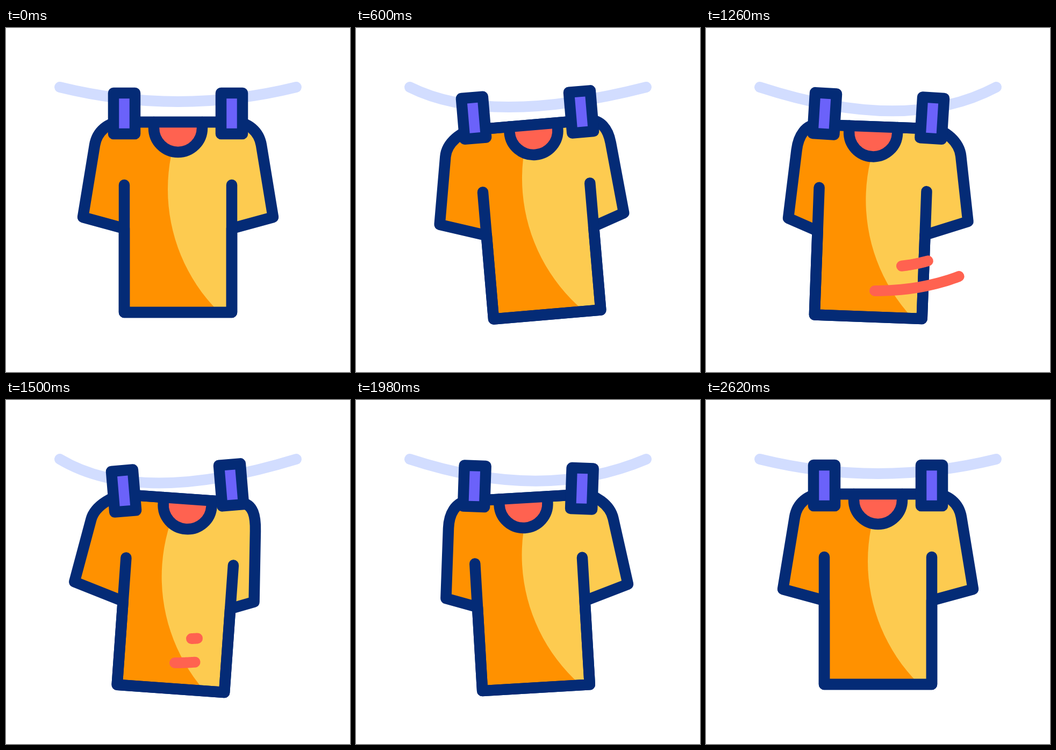
Animation of 640x640 px, one loop 3000 ms. Source, as an HTML page with a canvas:

```html
<!DOCTYPE html>
<html lang="en">
<head>
<meta charset="utf-8">
<title>Shirt on a clothesline</title>
<style>
  html, body { margin: 0; width: 100%; height: 100%; overflow: hidden; background: #fff; }
  canvas { display: block; }
</style>
</head>
<body>
<canvas width="640" height="640"></canvas>
<script>
const ctx = document.querySelector('canvas').getContext('2d');
const LOOP = 3000, START = 200, END = 2610;
const LAG = 60, GAIN = 1.3; // the shirt follows the pegs later and wider
const NAVY = '#042b76', ORANGE = '#ff9100', YELLOW = '#fdcb50';
const RED = '#ff6250', PURPLE = '#6b62fa', ROPE = '#d2ddff';

const clamp = v => Math.max(0, Math.min(1, v));
const ease = u => (1 - Math.cos(Math.PI * u)) / 2;
const radians = deg => deg * Math.PI / 180;

// Turning points of the peg tilt: time, degrees
const turns = [
  [START, 0], [360, 5], [590, -4.8], [890, -6.4], [1400, 5.6], [1540, -7],
  [1685, 5.7], [1850, -5.5], [2040, 4], [2205, -5.3], [2400, 3.2], [END - LAG, 0]
];

const tiltAt = t => turns.reduce((angle, [time, target], i) => {
  if (!i) return target;
  const before = turns[i - 1][0];
  return angle + (target - angle) * ease(clamp((t - before) / (time - before)));
}, 0);

const sagAt = t => 4.5 * Math.sin(Math.PI * clamp((t - START) / (END - START))) ** 0.8;

function stroke(color, path) {
  ctx.strokeStyle = color;
  ctx.stroke(path);
}

function fill(color, path) {
  ctx.fillStyle = color;
  ctx.fill(path);
}

function peg(x, y, angle) {
  ctx.save();
  ctx.translate(x, y);
  ctx.rotate(angle);
  const box = new Path2D('M-20-38h40v76h-40z');
  fill(PURPLE, box);
  stroke(NAVY, box);
  ctx.restore();
}

const gusts = [
  { curve: [502, 398, 415, 442, 345, 444], head: [811, 1330], tail: [920, 1550] },
  { curve: [511, 444, 425, 489, 314, 489], head: [960, 1250], tail: [1170, 1570] }
];

function gust({ curve: [x0, y0, x1, y1, x2, y2], head, tail }, t) {
  const part = ([a, b]) => clamp((t - a) / (b - a));
  const start = part(tail), end = part(head);
  if (end <= start) return;
  const line = new Path2D();
  for (let i = 0; i <= 24; i++) {
    const u = start + (end - start) * i / 24, w = 1 - u;
    line.lineTo(w * w * x0 + 2 * u * w * x1 + u * u * x2, w * w * y0 + 2 * u * w * y1 + u * u * y2);
  }
  stroke(RED, line);
}

function draw(t) {
  const tilt = tiltAt(t), swing = GAIN * tiltAt(t - LAG), sag = sagAt(t);
  const x = 320 - 1.85 * tilt - 1.38 * swing, y = 292 + 1.9 * sag;
  const collarX = 0.36 * swing - 1.16 * tilt;
  const angle = radians(swing), cos = Math.cos(angle), sin = Math.sin(angle);
  const at = (px, py) => [x + (px - 320) * cos - (py - 292) * sin, y + (px - 320) * sin + (py - 292) * cos];

  // Points from the collar side of a shoulder down to the armpit; side is -1 or 1
  function sleeve(side) {
    const sx = 320 + side * (155 - 0.5 * sag) + tilt - swing;
    const sy = 218 + 3.3 * sag + side * 2.7 * swing;
    const cx = 320 + side * (177 - 2.2 * sag) + 2.27 * tilt - 3.67 * swing;
    const cy = 352 + 1.1 * sag + side * (3.31 * swing - 1.1 * tilt);
    const k = 26 / Math.hypot(sx - cx, sy - cy);
    return {
      top: at(320 + side * 105, 175), bend: at(320 + side * 130, 175),
      lift: [sx + (sx - cx) * k, sy + (sy - cy) * k],
      shoulder: [sx, sy], cuff: [cx, cy], pit: at(320 + side * 100, 373)
    };
  }
  const l = sleeve(-1), r = sleeve(1);

  const shirt = new Path2D();
  shirt.moveTo(...l.top);
  shirt.bezierCurveTo(...l.bend, ...l.lift, ...l.shoulder);
  for (const p of [l.cuff, l.pit, at(220, 529), at(420, 529), r.pit, r.cuff, r.shoulder]) shirt.lineTo(...p);
  shirt.bezierCurveTo(...r.lift, ...r.bend, ...r.top);
  shirt.closePath();

  const toBody = () => {
    ctx.translate(x, y);
    ctx.rotate(angle);
    ctx.translate(-320, -292);
  };

  ctx.clearRect(0, 0, 640, 640);
  ctx.lineCap = ctx.lineJoin = 'round';
  ctx.lineWidth = 20;
  stroke(ROPE, new Path2D(`M100 110Q${320 + 15 * tilt} ${164 + 7.8 * sag} 540 110`));

  ctx.lineWidth = 20.5;
  fill(ORANGE, shirt);
  ctx.save();
  ctx.clip(shirt);
  toBody();
  const light = new Path2D();
  light.arc(623 - 1.9 * collarX, 300, 322, 0, 7);
  fill(YELLOW, light);
  ctx.restore();
  stroke(NAVY, shirt);

  ctx.save();
  toBody();
  const collar = new Path2D(`M${275 + collarX} 175v11a45 45 0 0 0 90 0v-11`);
  fill(RED, collar);
  stroke(NAVY, collar);
  stroke(NAVY, new Path2D('M215 175H425M220 292V529H420V292'));
  ctx.restore();

  for (const side of [-1, 1]) {
    peg(320 + side * 100 + 0.2 * tilt, 159 + sag + side * 1.18 * tilt, radians(tilt));
  }
  ctx.lineWidth = 20;
  for (const g of gusts) gust(g, t);
}

function tick() {
  draw(performance.now() % LOOP);
  requestAnimationFrame(tick);
}
tick();
</script>
</body>
</html>
```
